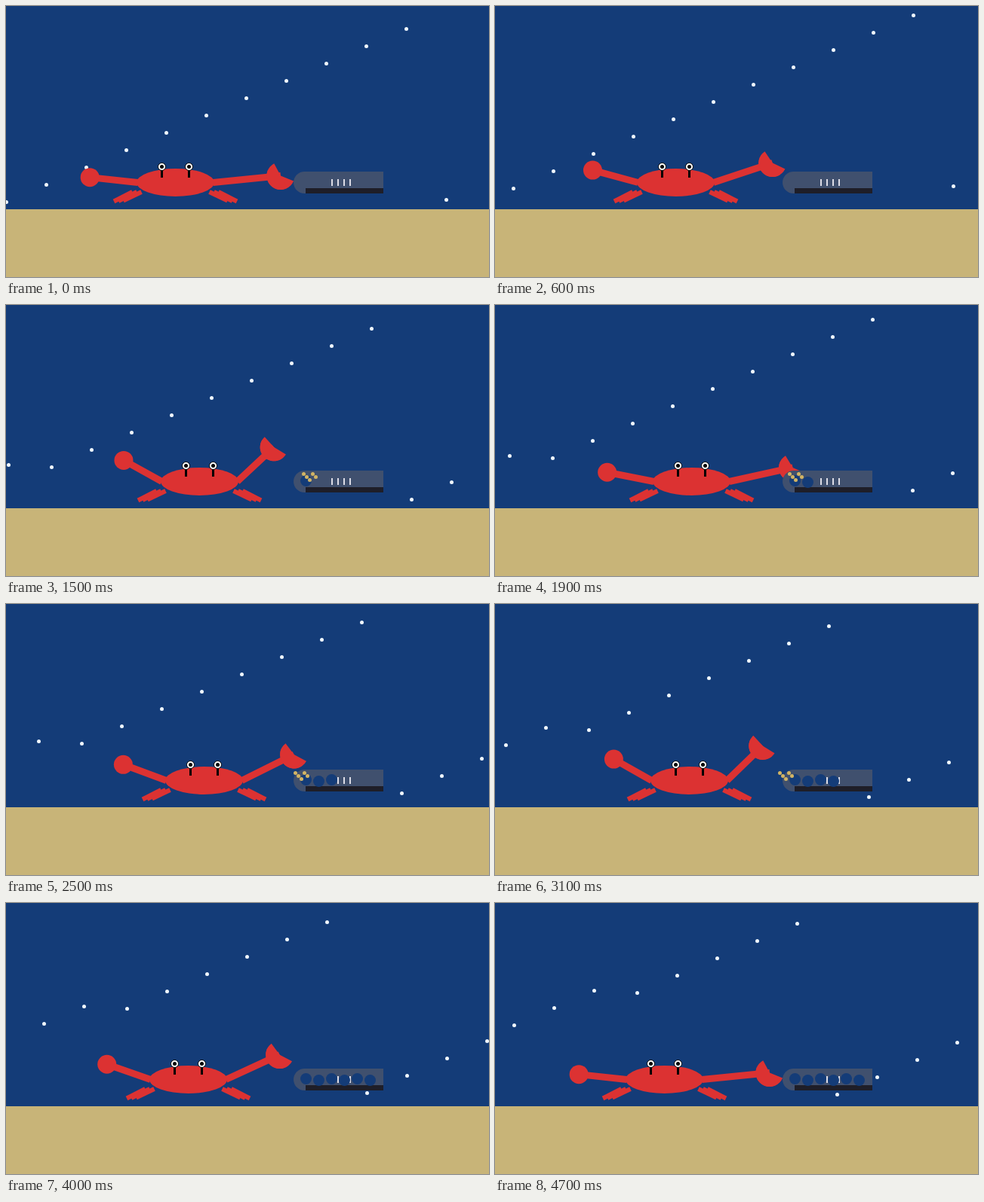
An HTML page without scripts that plays this animation: 640x360 px, repeating every 4.8 s.

```html
<!DOCTYPE html>
<html lang="en">
<head>
<meta charset="utf-8">
<title>Crab and can</title>
<style>
@property --f { syntax: "<integer>"; inherits: true; initial-value: 0; }
@keyframes tick { from { --f: 0; } to { --f: 48; } }

html, body { margin: 0; width: 100%; height: 100%; overflow: hidden; background: #143c78; }
svg { display: block; width: 640px; height: 360px; animation: tick 4.8s steps(48) infinite; }

/* p: progress through the loop, s: one of three claw strokes */
.scene {
  --p: calc(var(--f) / 47);
  --s: calc(mod(3 * var(--f), 47) / 47);
}

.bubbles circle {
  r: 2.5px;
  fill: #f0f8ff;
  transform: translate(
    calc((mod(53 * var(--i) + 4 * var(--f), 640) + .5) * 1px),
    calc((260.5 - mod(23 * var(--i) + 3 * var(--f), 250)) * 1px));
}

.crab {
  fill: #dc3232;
  transform: translate(calc(round(38 * sin(var(--p) * 180deg)) * 1px), 0px);
}
.legs { stroke: #dc3232; stroke-width: 6; }

/* hx, hy: hand seen from the shoulder */
.left {
  --a: calc((11 + 42 * var(--s)) * 1deg);
  --hx: calc(28 + 36 * cos(var(--a)));
  --hy: calc(-36 * sin(var(--a)));
}
.right {
  --a: calc((25 + 40.5 * var(--s) + 8 * var(--s) * var(--s)) * 1deg);
  --hx: calc(26 + 70 * cos(var(--a)));
  --hy: calc(20.6 - 70 * sin(var(--a)));
}
.arm {
  width: calc(hypot(var(--hx), var(--hy)) * 1px);
  transform: rotate(atan2(var(--hy), var(--hx)));
}
.hand { transform: translate(calc(var(--hx) * 1px), calc(var(--hy) * 1px)); }
.lower { transform: rotate(calc((22 + 10 * var(--s)) * 1deg)); }
.upper { transform: rotate(calc((62 - 15 * var(--s)) * 1deg)); }

.bites circle {
  r: 7.5px;
  fill: #143c78;
  opacity: calc((var(--f) - 14.1 - 4.7 * var(--n)) * 99);
}
.crumbs {
  fill: #d2b464;
  opacity: calc(min(var(--f) - 14.1, 37.6 - var(--f)) * 99);
  transform: translate(calc(round(410 - 50 * var(--p)) * 1px), 0px);
}
</style>
</head>
<body>
<svg viewBox="0 0 640 360">
  <defs>
    <path id="half" d="M18.5 0A18.5 18.5 0 0 1 -18.5 0Z"/>
    <path id="legs" d="M45 247L69 258.5M51 247L75.5 259M57 247L81.5 259.5"/>
    <g id="eye">
      <path d="M0 213V228" stroke="#000" stroke-width="3"/>
      <circle cy="213.5" r="5" fill="#fff" stroke="#000"/>
      <circle cy="213.5" r="2.5" fill="#000"/>
    </g>
  </defs>

  <g class="scene">
    <rect width="640" height="360" fill="#143c78"/>
    <rect y="270" width="640" height="90" fill="#c8b478"/>

    <g class="bubbles">
      <circle style="--i:0"/><circle style="--i:1"/><circle style="--i:2"/>
      <circle style="--i:3"/><circle style="--i:4"/><circle style="--i:5"/>
      <circle style="--i:6"/><circle style="--i:7"/><circle style="--i:8"/>
      <circle style="--i:9"/><circle style="--i:10"/><circle style="--i:11"/>
    </g>

    <g class="crab">
      <g transform="translate(224.5)">
        <g class="legs">
          <use href="#legs"/>
          <use href="#legs" transform="scale(-1 1)"/>
        </g>
        <g transform="translate(-50 234.5) scale(-1 1)">
          <g class="left">
            <rect class="arm" y="-4.5" height="9"/>
            <circle class="hand" r="12.5"/>
          </g>
        </g>
        <g transform="translate(50 234.5)">
          <g class="right">
            <rect class="arm" y="-4.5" height="9"/>
            <g class="hand">
              <use class="lower" href="#half"/>
              <use class="upper" href="#half"/>
            </g>
          </g>
        </g>
        <ellipse cy="234.5" rx="51.5" ry="18.5"/>
        <use href="#eye" x="-18"/>
        <use href="#eye" x="18"/>
      </g>
    </g>

    <path d="M500 220H395.5A14.5 14.5 0 0 0 395.5 249H500Z" fill="#40506e"/>
    <rect x="397" y="242" width="103" height="7" fill="#1e1e28"/>
    <path d="M432 230V239M440 230V239M448 230V239M456 230V239" stroke="#dcdce6" stroke-width="2"/>

    <g class="bites">
      <circle style="--n:0" cx="397.5" cy="233.5"/>
      <circle style="--n:1" cx="414.5" cy="235.5"/>
      <circle style="--n:2" cx="431.5" cy="233.5"/>
      <circle style="--n:3" cx="448.5" cy="235.5"/>
      <circle style="--n:4" cx="465.5" cy="233.5"/>
      <circle style="--n:5" cx="482.5" cy="235.5"/>
    </g>

    <g class="crumbs">
      <circle cx=".5" cy="224.5" r="2.5"/>
      <circle cx="4.5" cy="228.5" r="2.5"/>
      <circle cx="8.5" cy="232.5" r="2.5"/>
      <circle cx="12.5" cy="224.5" r="2.5"/>
      <circle cx="16.5" cy="228.5" r="2.5"/>
    </g>
  </g>
</svg>
</body>
</html>
```
